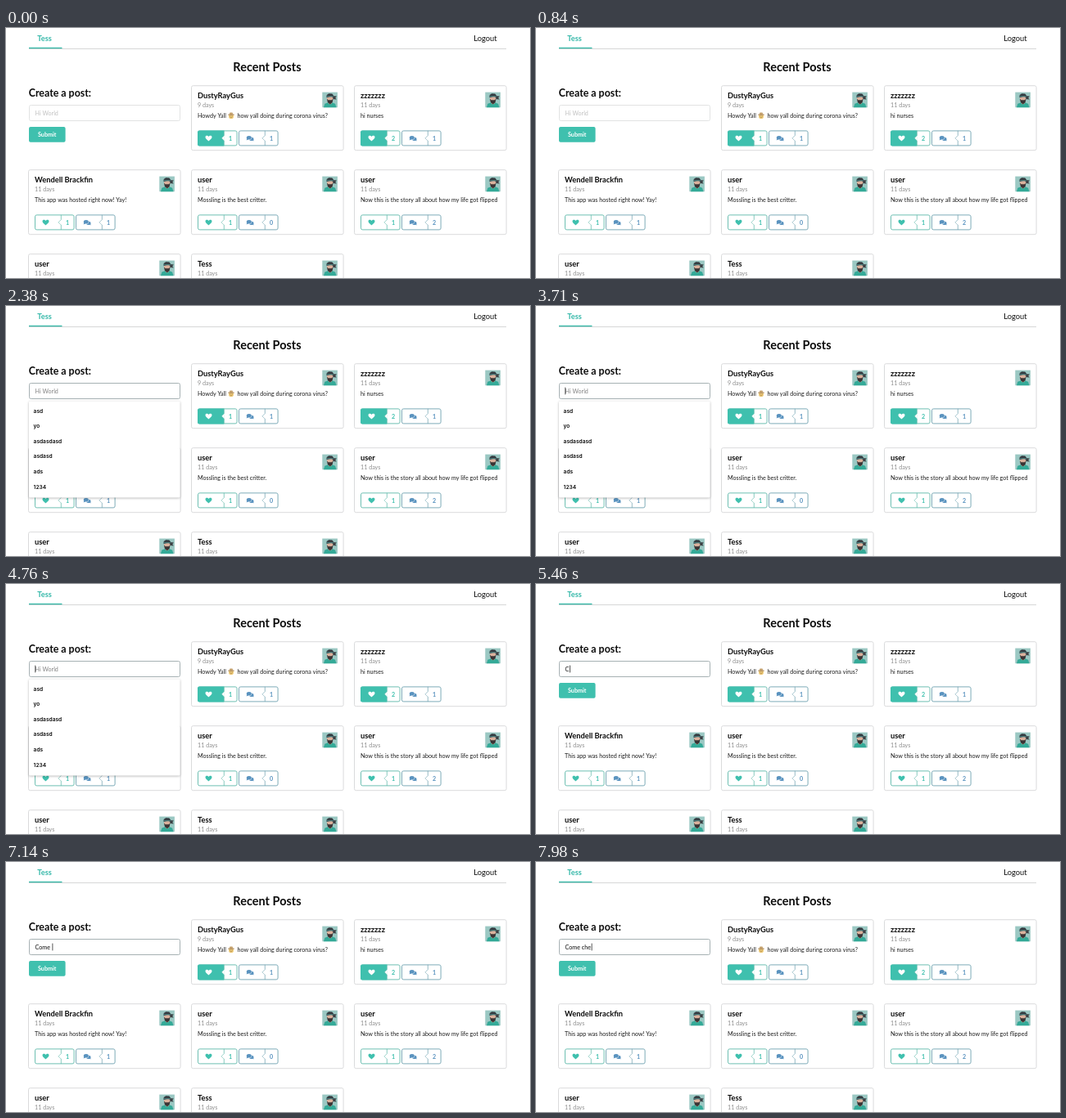
These frames come from a looping animation (640x306 px, 8 s). An HTML page with a canvas:

```html
<!DOCTYPE html>
<html lang="en">
<head>
<meta charset="utf-8">
<title>Recent Posts</title>
<style>
  html, body { margin: 0; width: 100%; height: 100%; overflow: hidden; background: #fff; }
  canvas { display: block; width: 640px; height: 306px; }
</style>
</head>
<body>
<canvas id="stage"></canvas>
<script>
const W = 640, H = 306, LOOP = 8000;
const TEAL = '#3fc0ae', BLUE = '#5a93bf', INK = '#0c0c0c', LINE = '#dadbdc';
const TEAL_EDGE = '#6dbfb2', BLUE_EDGE = '#7dabb8';
const LATO = 'Lato, sans-serif', BODY = 7.16, TITLE = 9.3;
const FOCUS = 1680;

// Text in the field from each moment on.
const typing = [
  [5400, 'C'], [5550, 'Co'], [5720, 'Com'], [5900, 'Come'], [6150, 'Comec'],
  [6650, 'Come'], [6950, 'Come '], [7250, 'Come c'], [7500, 'Come ch'], [7750, 'Come che']
];
const suggestions = ['asd', 'yo', 'asdasdasd', 'asdasd', 'ads', '1234'];
const posts = [
  { x: 227, y: 71, name: 'DustyRayGus', age: '9 days', likes: 1, notes: 1, liked: true, greeting: true },
  { x: 426, y: 71, name: 'zzzzzzz', age: '11 days', text: 'hi nurses', likes: 2, notes: 1, liked: true },
  { x: 28, y: 174, name: 'Wendell Brackfin', age: '11 days', text: 'This app was hosted right now! Yay!', likes: 1, notes: 1 },
  { x: 227, y: 174, name: 'user', age: '11 days', text: 'Mossling is the best critter.', likes: 1, notes: 0 },
  { x: 426, y: 174, name: 'user', age: '11 days', text: 'Now this is the story all about how my life got flipped', likes: 1, notes: 2 },
  { x: 28, y: 277, name: 'user', age: '11 days', text: '', likes: 0, notes: 0 },
  { x: 227, y: 277, name: 'Tess', age: '11 days', text: '', likes: 0, notes: 0 }
];

const canvas = document.getElementById('stage');
const ctx = canvas.getContext('2d');
const ratio = window.devicePixelRatio || 1;
canvas.width = W * ratio;
canvas.height = H * ratio;

function text(str, x, y, size, color = INK, weight = 400, align = 'left', family = LATO) {
  ctx.font = `${weight} ${size}px ${family}`;
  ctx.fillStyle = color;
  ctx.textAlign = align;
  ctx.fillText(str, x, y);
}

function box(x, y, w, h, r, fill, stroke, width = 1) {
  ctx.beginPath();
  ctx.roundRect(x, y, w, h, r);
  if (fill) { ctx.fillStyle = fill; ctx.fill(); }
  if (stroke) { ctx.strokeStyle = stroke; ctx.lineWidth = width; ctx.stroke(); }
}

function rect(x, y, w, h, color) {
  ctx.fillStyle = color;
  ctx.fillRect(x, y, w, h);
}

function oval(x, y, rx, ry, color) {
  ctx.beginPath();
  ctx.ellipse(x, y, rx, ry, 0, 0, Math.PI * 2);
  ctx.fillStyle = color;
  ctx.fill();
}

function shape(points, color) {
  ctx.beginPath();
  points.forEach(([x, y]) => ctx.lineTo(x, y));
  ctx.fillStyle = color;
  ctx.fill();
}

function at(x, y, draw) {
  ctx.save();
  ctx.translate(x, y);
  draw();
  ctx.restore();
}

function heart(x, y, color) {
  at(x, y, () => {
    ctx.beginPath();
    ctx.moveTo(0, 3.6);
    ctx.bezierCurveTo(-1, 2.6, -4, .5, -4, -1.4);
    ctx.bezierCurveTo(-4, -3.8, -1.1, -4, 0, -1.9);
    ctx.bezierCurveTo(1.1, -4, 4, -3.8, 4, -1.4);
    ctx.bezierCurveTo(4, .5, 1, 2.6, 0, 3.6);
    ctx.fillStyle = color;
    ctx.fill();
  });
}

function bubbles(x, y) {
  at(x, y, () => {
    oval(1.8, .9, 2.7, 2.1, BLUE);
    shape([[2.5, 2], [4.6, 3.6], [4, 1]], BLUE);
    oval(-1.2, -.8, 3.4, 2.7, '#fff');
    oval(-1.2, -.8, 3, 2.3, BLUE);
    shape([[-3.8, 0], [-4.3, 2.5], [-1.5, 1]], BLUE);
  });
}

function avatar(x, y) {
  at(x, y, () => {
    rect(0, 0, 18.6, 18.6, '#9bc8c3');
    shape([[12, 4.5], [17.6, 4.8], [16, 7], [17.4, 9], [12.5, 8.5]], '#3b4145');
    shape([[1.6, 18.6], [3, 14.2], [7, 12.6], [12, 12.6], [15.8, 14.2], [17.2, 18.6]], '#34aa98');
    rect(7.7, 11.5, 3.6, 3, '#c99d88');
    oval(9.4, 7.6, 3.7, 4.6, '#dbb19c');
    shape([[5.6, 8], [7.2, 9.7], [11.6, 9.7], [13.2, 8], [12.4, 12.5], [9.5, 14.6], [6.6, 12.5]], '#3a3435');
    shape([[5.2, 6.6], [5.4, 3.5], [8, 1.6], [12, 1.9], [13.7, 4], [13.4, 6.6], [11, 5]], '#343b40');
    rect(5.3, 4.5, 8.3, 1.3, '#477b7c');
  });
}

function counter(x, y, color, edge, count, solid) {
  const split = 32.3, mid = 9.4;
  at(x, y, () => {
    box(.5, .5, 47.6, 18, 2, '#fff', edge, 1);
    if (solid) box(0, 0, split, 19, [2, 0, 0, 2], color);
    ctx.beginPath();
    ctx.moveTo(split, .4);
    ctx.lineTo(split, mid - 3.2);
    ctx.lineTo(split - 3.2, mid);
    ctx.lineTo(split, mid + 3.2);
    ctx.lineTo(split, 18.6);
    ctx.strokeStyle = edge;
    ctx.lineWidth = .8;
    ctx.stroke();
    shape([[split + .3, mid - 3.1], [split - 2.7, mid], [split + .3, mid + 3.1]], '#fff');
    text(count, 40, 12.1, BODY, color, 700, 'center');
  });
}

function cowboy(x, y) {
  at(x, y, () => {
    oval(0, 1, 3, 3, '#efcb78');
    oval(0, -1.2, 4, .9, '#b59263');
    box(-2, -3.7, 4, 2.5, 1, '#c4a06c');
    oval(-1.1, .6, .4, .5, '#7d6236');
    oval(1.1, .6, .4, .5, '#7d6236');
    rect(-1.2, 2.1, 2.4, .5, '#9a743f');
  });
}

function card(p) {
  const left = p.x + 7;
  box(p.x - .5, p.y - .3, 185.6, 79, 2, '#fff', LINE, 1);
  text(p.name, left, p.y + 15.3, TITLE, INK, 700);
  text(p.age, left, p.y + 25.5, BODY, '#8e8e8e');
  avatar(p.x + 159.3, p.y + 7.6);
  if (p.greeting) {
    text('Howdy Yall', left, p.y + 38.8, BODY, '#1c1c1c');
    cowboy(p.x + 48, p.y + 36.3);
    text('how yall doing during corona virus?', p.x + 55.4, p.y + 38.8, BODY, '#1c1c1c');
  } else {
    text(p.text, left, p.y + 38.8, BODY, '#1c1c1c');
  }
  counter(left, p.y + 54.4, TEAL, TEAL_EDGE, p.likes, p.liked);
  heart(left + 13.5, p.y + 64, p.liked ? '#fff' : TEAL);
  counter(p.x + 57, p.y + 54.4, BLUE, BLUE_EDGE, p.notes, false);
  bubbles(p.x + 71, p.y + 64);
}

function header() {
  rect(28, 25, 583, 1, '#d6d7d7');
  rect(28, 23.8, 40.5, 1.4, '#38b8a8');
  text('Tess', 38.3, 16.2, TITLE, '#35b8a9', 700);
  text('Logout', 571.3, 16.2, TITLE);
  text('Recent Posts', 319, 53.2, 14.5, INK, 700, 'center');
}

function form(t) {
  const focused = t >= FOCUS;
  const last = typing.filter(([when]) => t >= when).pop();
  const value = last ? last[1] : '';
  const since = t - (last ? last[0] : FOCUS);
  const left = 35.5, base = 106.7;

  text('Create a post:', 27.7, 84, 12.4, INK, 700);
  box(28.5, 94.5, 184, 19, 2, '#fff', focused ? '#a6b1b3' : '#e2e3e3', 1);
  if (value) text(value, left, base, BODY, INK);
  else text('Hi World', left, base, BODY, focused ? '#808080' : '#c0c0c0');

  ctx.font = `400 ${BODY}px ${LATO}`;
  const end = left + ctx.measureText(value).width;
  if (value === 'Comec') rect(left + .2, 108, end - left - .4, .8, '#666');
  if (focused && since % 1000 < 500) rect(end + (value ? .8 : 0), 99.6, .7, 8.8, INK);

  box(28, 121, 44.6, 18.8, 2, TEAL);
  text('Submit', 50.2, 132.8, BODY, '#fff', 700, 'center');
}

function dropdown() {
  ctx.save();
  ctx.shadowColor = 'rgba(0,0,0,.3)';
  ctx.shadowBlur = 3 * ratio;
  ctx.shadowOffsetY = .8 * ratio;
  box(28, 116.5, 184.6, 118, 1.5, '#fff');
  ctx.restore();
  suggestions.forEach((word, i) =>
    text(word, 33.6, 130.6 + i * 18.6, 6.6, INK, 600, 'left', 'Inter, sans-serif'));
}

function draw(t) {
  ctx.setTransform(ratio, 0, 0, ratio, 0, 0);
  rect(0, 0, W, H, '#fff');
  header();
  posts.forEach(card);
  form(t);
  if (t >= FOCUS && t < typing[0][0]) dropdown();
}

const start = performance.now();
function tick() {
  draw((performance.now() - start) % LOOP);
  requestAnimationFrame(tick);
}
tick();
</script>
</body>
</html>
```
